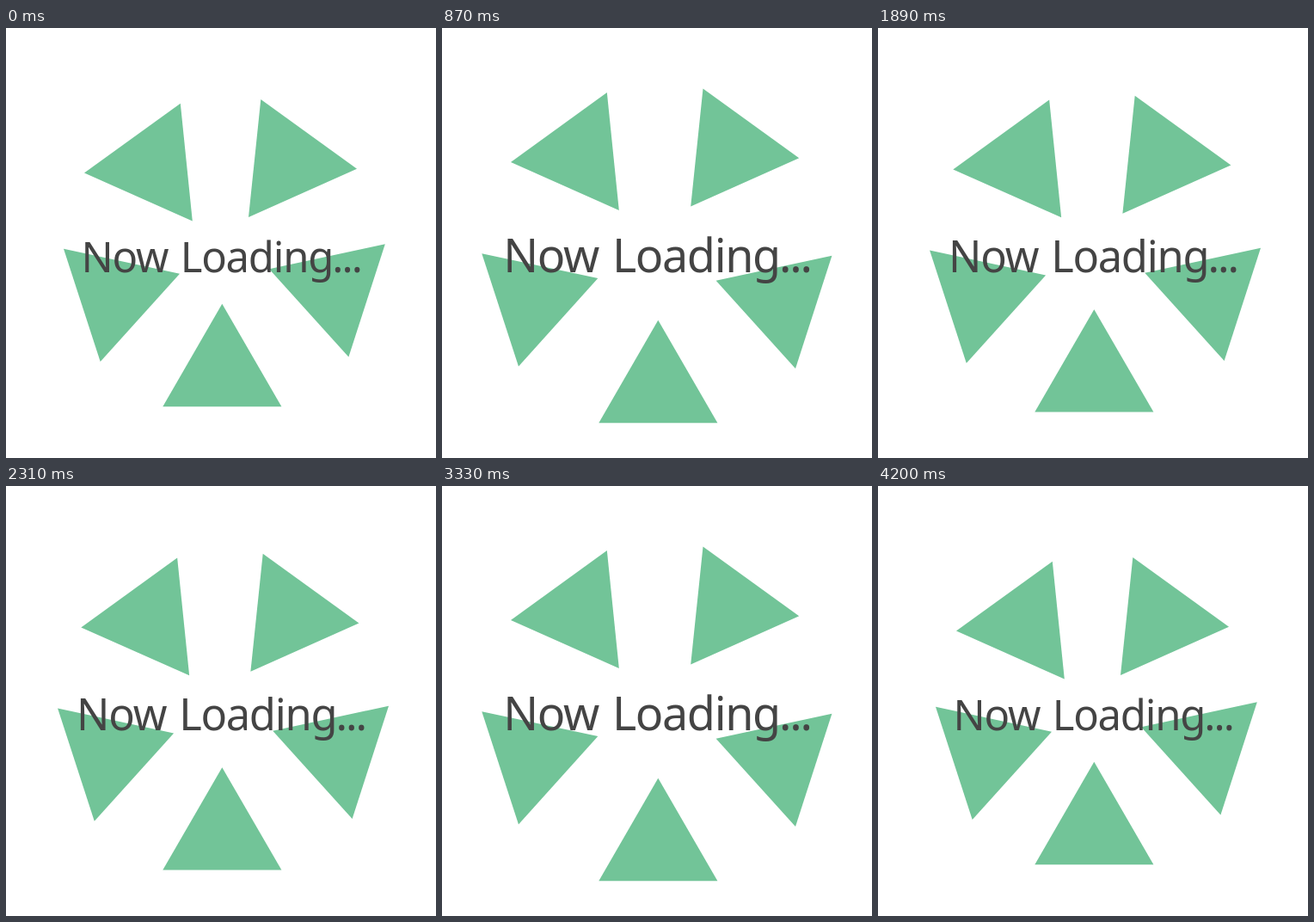
An HTML page for the animation above (4500 ms loop, 500 by 500 pixels).

```html
<!DOCTYPE html>
<html lang="en">
<head>
<meta charset="utf-8">
<title>Now Loading</title>
<style>
  html, body { margin: 0; height: 100%; overflow: hidden; background: #fff; }
  svg { display: block; width: 100%; height: 100%; }
  polygon { fill: #72c498; }
  text {
    font: 49px "Noto Sans", "Open Sans", sans-serif;
    letter-spacing: -1.23px;
    word-spacing: 3px;
    fill: #444;
  }
  .tail { letter-spacing: -2px; }
</style>
</head>
<body>
<svg viewBox="0 0 500 500">
  <g id="petals"></g>
  <text id="label" x="-163.7">Now Loadin<tspan class="tail">g...</tspan></text>
</svg>
<script>
const LOOP = 4500, STEP = 30, LAST = 4200, HALF = 300;

// Corner points at rest and the outward shift at full spread
const petals = [
  { points: "202.8,87.7 91,168.6 216.8,224.5", dx: -12.2, dy: -14 },
  { points: "296.3,83 408,163.8 282,220", dx: 8, dy: -14 },
  { points: "67,256.8 202,285.7 109.7,388", dx: -23, dy: 6 },
  { points: "440.8,251.2 306,280.2 398.4,382.4", dx: 14, dy: 15 },
  { points: "251.3,320.8 320.4,440.2 182.3,440.2", dx: 0, dy: 21.1 }
];
const group = document.getElementById("petals");
const label = document.getElementById("label");

for (const p of petals) {
  p.node = document.createElementNS("http://www.w3.org/2000/svg", "polygon");
  p.node.setAttribute("points", p.points);
  group.append(p.node);
}

function draw(now) {
  const t = Math.min(LAST, Math.floor((now % LOOP) / STEP) * STEP);
  const spread = 1 - Math.abs(t % (2 * HALF) - HALF) / HALF;
  for (const { node, dx, dy } of petals) {
    node.setAttribute("transform", `translate(${dx * spread} ${dy * spread})`);
  }
  label.setAttribute("transform", `translate(251.2 283.6) scale(${1 + 0.11 * spread})`);
}

const start = performance.now();
function tick() {
  draw(performance.now() - start);
  requestAnimationFrame(tick);
}
tick();
</script>
</body>
</html>
```
